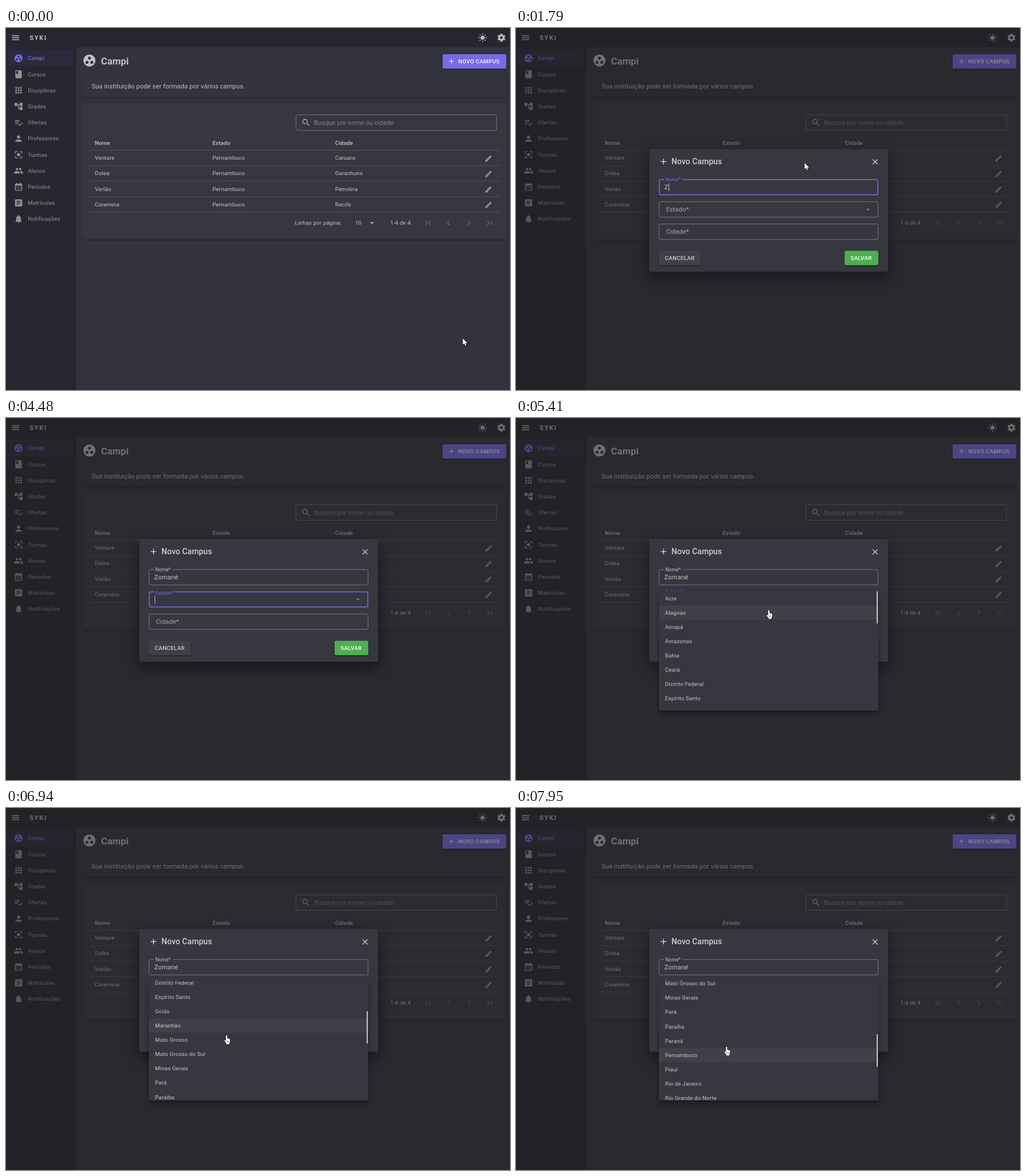
Recreate the animation shown at these times as an HTML page with a canvas. Size 882 px wide and 635 px high, loop 7990 ms.

```html
<!DOCTYPE html>
<html lang="pt-BR">
<head>
<meta charset="utf-8">
<title>Campi</title>
<style>
html, body { margin: 0; width: 100%; height: 100%; overflow: hidden; background: #32333d; }
canvas { display: block; }
</style>
</head>
<body>
<canvas id="stage" width="882" height="635"></canvas>
<script>
const ctx = document.getElementById('stage').getContext('2d');
const LOOP = 7990;
const SURFACE = '#373740', PRIMARY = '#776be7';
const white = a => `rgba(255,255,255,${a})`;

const ring = (x, y, r) => `M${x - r} ${y}a${r} ${r} 0 1 0 ${2 * r} 0a${r} ${r} 0 1 0 ${-2 * r} 0z`;
const cells = (xs, ys, s) => ys.map(y => xs.map(x => `M${x} ${y}h${s}v${s}h${-s}z`).join('')).join('');
const sheet = (x, y, w, h) => `M${x + 2} ${y}h${w - 4}a2 2 0 0 1 2 2v${h - 4}a2 2 0 0 1-2 2h${4 - w}a2 2 0 0 1-2-2v${4 - h}a2 2 0 0 1 2-2z`;

const ICONS = {
  group: ring(12, 12, 10) + ring(8, 15, 2.5) + ring(12, 8, 2.5) + ring(16, 15, 2.5),
  book: sheet(4, 2, 16, 20) + 'M6 4h5v8l-2.5-1.5L6 12z',
  grid: cells([4, 10, 16], [4, 10, 16], 4),
  tree: 'M22 11V3h-7v3H9V3H2v8h7V8h2v10h4v3h7v-8h-7v3h-2V8h2v3z',
  check: 'M3 6h11v2H3zM3 10h11v2H3zM3 14h7v2H3zM20.6 11.9L22 13.3 14.9 20.4 11 16.5l1.4-1.4 2.5 2.5z',
  person: ring(12, 8, 4) + 'M12 14c-2.7 0-8 1.3-8 4v2h16v-2c0-2.7-5.3-4-8-4z',
  focus: 'M5 15H3v4a2 2 0 0 0 2 2h4v-2H5zM5 5h4V3H5a2 2 0 0 0-2 2v4h2zM19 3h-4v2h4v4h2V5a2 2 0 0 0-2-2zM19 19h-4v2h4a2 2 0 0 0 2-2v-4h-2z' + ring(12, 12, 4),
  people: ring(16, 8, 3) + ring(8, 8, 3) + 'M8 13c-2.3 0-7 1.2-7 3.5V19h14v-2.5C15 14.2 10.3 13 8 13zM16 13l-1 .1c1.2.8 2 2 2 3.4V19h6v-2.5c0-2.3-4.7-3.5-7-3.5z',
  calendar: sheet(3, 4, 18, 18) + 'M6 2h2v2H6zM16 2h2v2h-2zM5 9h14v11H5z' + cells([7, 11, 15], [11, 15], 2),
  article: sheet(3, 3, 18, 18) + 'M7 7h10v2H7zM7 11h10v2H7zM7 15h7v2H7z',
  bell: 'M12 22a2 2 0 0 0 2-2h-4a2 2 0 0 0 2 2zM18 16v-5c0-3.1-1.6-5.6-4.5-6.3V4a1.5 1.5 0 0 0-3 0v.7C7.6 5.4 6 7.9 6 11v5l-2 2v1h16v-1z',
  search: ring(9.5, 9.5, 6.5) + ring(9.5, 9.5, 4.5) + 'M14 15.5l1.5-1.5 5 5-1.5 1.5z',
  edit: 'M14.1 9l.9.9L5.9 19H5v-.9zM17.7 3l-.7.3-1.8 1.8 3.7 3.7 1.8-1.8c.4-.4.4-1 0-1.4l-2.3-2.3zM14.1 6.2L3 17.3V21h3.7L17.8 9.9z',
  menu: 'M3 6h18v2H3zM3 11h18v2H3zM3 16h18v2H3z',
  plus: 'M11 5h2v6h6v2h-6v6h-2v-6H5v-2h6z',
  close: 'M19 6.4L17.6 5 12 10.6 6.4 5 5 6.4l5.6 5.6L5 17.6 6.4 19l5.6-5.6 5.6 5.6 1.4-1.4-5.6-5.6z',
  drop: 'M7 10l5 5 5-5z',
  left: 'M15.4 7.4L14 6l-6 6 6 6 1.4-1.4L10.8 12z',
  right: 'M10 6L8.6 7.4l4.6 4.6-4.6 4.6L10 18l6-6z',
  first: 'M18.4 16.6L13.8 12l4.6-4.6L17 6l-6 6 6 6zM6 6h2v12H6z',
  last: 'M5.6 7.4l4.6 4.6-4.6 4.6L7 18l6-6-6-6zM16 6h2v12h-2z'
};
const shapes = Object.fromEntries(Object.entries(ICONS).map(([k, d]) => [k, new Path2D(d)]));
const ARROW = new Path2D('M0 0v11.2l2.6-2.4 1.7 3.9 1.7-.7-1.7-3.8h3.6z');
const HAND = new Path2D('M-1.2 1a1.2 1.2 0 0 1 2.4 0v4l3.9.9q1.2.4 1 1.8l-.5 4q-.3 1.2-.9 2v1.5h-5.2v-1.3l-3.2-4.6q-.4-1.4 1-1.4l1.5 1.3z');

const NAV = [['Campi', 'group'], ['Cursos', 'book'], ['Disciplinas', 'grid'], ['Grades', 'tree'],
  ['Ofertas', 'check'], ['Professores', 'person'], ['Turmas', 'focus'], ['Alunos', 'people'],
  ['Períodos', 'calendar'], ['Matrículas', 'article'], ['Notificações', 'bell']];
const ROWS = [['Ventare', 'Caruaru'], ['Dolea', 'Garanhuns'], ['Verlão', 'Petrolina'], ['Coremina', 'Recife']];
const STATES = ['Acre', 'Alagoas', 'Amapá', 'Amazonas', 'Bahia', 'Ceará', 'Distrito Federal',
  'Espírito Santo', 'Goiás', 'Maranhão', 'Mato Grosso', 'Mato Grosso do Sul', 'Minas Gerais', 'Pará',
  'Paraíba', 'Paraná', 'Pernambuco', 'Piauí', 'Rio de Janeiro', 'Rio Grande do Norte',
  'Rio Grande do Sul', 'Rondônia', 'Roraima', 'Santa Catarina', 'São Paulo', 'Sergipe', 'Tocantins'];

// Timeline
const NAME = 'Zomané', KEYS = [1790, 2120, 2240, 2500, 3240, 3740];
const CLICK = 655, OPEN = 690, FOCUS = 725, TAB = 4386, LIST = 5090;
const NOTCHES = [6200, 6530, 6865, 7220], NOTCH_MS = 230, NOTCH = 71.1;
const PATH = [[30, 799.5, 544.5], [640, 798, 58], [850, 798, 58], [1580, 505, 236.5], [4500, 505, 236.5],
  [5060, 450, 329], [5150, 450, 329], [6366, 386, 399], [7600, 386, 399], [7840, 375, 425], [7950, 368.5, 419]];
const LIST_TOP = 303.6, LIST_H = 209.4, ROW = 25.1;

const ramp = (t, from, ms) => Math.min(1, Math.max(0, (t - from) / ms));
const smooth = u => u * u * (3 - 2 * u);
const easeOut = u => 1 - (1 - u) ** 3;
const mix = (a, b, p) => a + (b - a) * p;

function pointer(t) {
  const i = PATH.findIndex(k => k[0] > t);
  if (i < 0) return PATH[PATH.length - 1].slice(1);
  if (i === 0) return PATH[0].slice(1);
  const [t0, x0, y0] = PATH[i - 1], [t1, x1, y1] = PATH[i];
  const p = smooth((t - t0) / (t1 - t0));
  return [mix(x0, x1, p), mix(y0, y1, p)];
}

function text(s, x, cy, size = 9.8, color = white(.7), weight = 400, spacing = size * .0107) {
  ctx.font = `${weight} ${size}px Roboto, sans-serif`;
  ctx.letterSpacing = spacing + 'px';
  ctx.fillStyle = color;
  ctx.fillText(s, x, cy + size * .3415);
}

function icon(name, cx, cy, color, size = 16.8) {
  ctx.save();
  ctx.translate(cx - size / 2, cy - size / 2);
  ctx.scale(size / 24, size / 24);
  ctx.fillStyle = color;
  ctx.fill(shapes[name], 'evenodd');
  ctx.restore();
}

function box(x, y, w, h, fill, r = 2.8) {
  ctx.beginPath();
  ctx.roundRect(x, y, w, h, r);
  ctx.fillStyle = fill;
  ctx.fill();
}

function raised(x, y, w, h, fill, blur, dy, alpha) {
  ctx.save();
  ctx.shadowColor = `rgba(0,0,0,${alpha})`;
  ctx.shadowBlur = blur;
  ctx.shadowOffsetY = dy;
  box(x, y, w, h, fill);
  ctx.restore();
}

function outline(x, y, w, h, color, width) {
  ctx.beginPath();
  ctx.roundRect(x + width / 2, y + width / 2, w - width, h - width, 2.8);
  ctx.strokeStyle = color;
  ctx.lineWidth = width;
  ctx.stroke();
}

function disc(x, y, r, color) {
  ctx.beginPath();
  ctx.arc(x, y, r, 0, 7);
  ctx.fillStyle = color;
  ctx.fill();
}

function spokes(cx, cy, n, r0, r1, width, color) {
  ctx.beginPath();
  for (let i = 0; i < n; i++) {
    const a = i * 2 * Math.PI / n, c = Math.sin(a), s = -Math.cos(a);
    ctx.moveTo(cx + c * r0, cy + s * r0);
    ctx.lineTo(cx + c * r1, cy + s * r1);
  }
  ctx.strokeStyle = color;
  ctx.lineWidth = width;
  ctx.stroke();
}

function drawBars() {
  ctx.fillStyle = '#27272f';
  ctx.fillRect(0, 0, 882, 33.6);
  ctx.fillRect(0, 33, 123, 602);
  icon('menu', 16.7, 17, white(.7));
  text('SYKI', 41.3, 17, 11.2, white(.7), 700, 1.6);
  const c = '#bebec1';
  disc(834, 17, 3.6, c);
  spokes(834, 17, 8, 5.3, 7.5, 1.3, c);
  disc(867, 17, 5.4, c);
  spokes(867, 17, 6, 4, 7, 3.6, c);
  disc(867, 17, 2.4, '#27272f');

  box(2, 39, 115, 28, 'rgba(119,107,231,.07)');
  NAV.forEach(([label, name], i) => {
    const y = 53 + i * 28.2, color = i ? white(.5) : PRIMARY;
    icon(name, 22, y, color);
    text(label, 38.3, y, 9.8, color, i ? 400 : 500);
  });
}

function drawPage(t) {
  ctx.fillStyle = '#32333d';
  ctx.fillRect(0, 0, 882, 635);
  drawBars();
  icon('group', 146, 57, white(.7), 25.2);
  text('Campi', 166.3, 58.3, 16.8, white(.7), 700, 0);

  const hover = ramp(t, 600, 120) * (1 - ramp(t, 760, 250));
  raised(764, 46, 111.5, 25.2, PRIMARY, 3, 1.5, .35);
  box(764, 46, 111.5, 25.2, `rgba(90,75,226,${hover})`);
  const wave = ramp(t, CLICK, 500);
  if (wave > 0 && wave < 1) {
    ctx.save();
    ctx.beginPath();
    ctx.rect(764, 46, 111.5, 25.2);
    ctx.clip();
    disc(800, 57.5, 60 * wave + 2.5, white(.28 * (1 - wave)));
    ctx.restore();
  }
  icon('plus', 779.5, 58.5, white(.95), 14);
  text('NOVO CAMPUS', 791.6, 58.6, 9.8, white(.95), 500, .28);

  raised(134, 83.5, 741.5, 37.5, '#33343e', 2.5, 1.3, .35);
  text('Sua instituição pode ser formada por vários campus.', 149.7, 102.6, 11.2);

  raised(134, 132, 741.5, 239, SURFACE, 2.5, 1.3, .35);
  outline(507, 151.7, 352, 28.3, white(.34), .9);
  icon('search', 525, 165.8, white(.6));
  text('Busque por nome ou cidade', 539, 166, 11.2, white(.38), 400, 0);

  ['Nome', 'Estado', 'Cidade'].forEach((s, i) => text(s, [155.4, 361.4, 576][i], 201.3, 9.8, white(.72), 500));
  ctx.fillStyle = white(.14);
  for (let i = 0; i < 5; i++) ctx.fillRect(145, 214 + i * 27.15, 719, 1);
  ROWS.forEach(([name, city], i) => {
    const y = 228 + i * 27.1;
    text(name, 155.6, y);
    text('Pernambuco', 361.3, y);
    text(city, 576, y);
    icon('edit', 844.3, y + 1, white(.65), 14);
  });

  text('Linhas por página:', 505.5, 341.4);
  text('10', 611, 341.4);
  icon('drop', 640.3, 342, white(.6));
  text('1-4 de 4', 672.4, 341.4);
  ['first', 'left', 'right', 'last'].forEach((n, i) => icon(n, 738.7 + i * 35.8, 342, white(.26)));
}

// p: how far the label has floated into the border
function field(y, label, value, p, focused, caret) {
  outline(250, y, 384, 28, focused ? PRIMARY : white(.36), focused ? 1.5 : .9);
  const size = mix(11.2, 8.4, p);
  if (p > 0) {
    ctx.fillStyle = SURFACE;
    ctx.fillRect(259.3, y - .3, label === 'Nome*' ? 32 : 36, 2.2);
  }
  text(label, mix(262.4, 261.5, p), mix(y + 14.3, y + .9, p), size, focused ? PRIMARY : white(p ? .7 : .55));
  text(value, 259.6, y + 14.2, 11.2);
  if (caret) {
    ctx.fillStyle = white(.8);
    ctx.fillRect(260.2 + ctx.measureText(value).width, y + 7.5, .9, 13.3);
  }
}

function drawDialog(t) {
  const p = easeOut(ramp(t, OPEN, 150));
  const k = mix(.25, 1, p);
  ctx.save();
  ctx.globalAlpha = Math.min(1, p * 1.3);
  ctx.translate(442.2, 319.9);
  ctx.scale(k, k);
  ctx.translate(-442.2, -319.9);
  raised(233.3, 212.2, 417.7, 215.4, SURFACE, 26, 10, .45);
  icon('plus', 258.2, 234.4, white(.8));
  text('Novo Campus', 272, 234.6, 14, white(.75), 500, .05);
  icon('close', 628.5, 234.8, white(.72));

  const typed = KEYS.filter(k => t >= k);
  const onName = t < TAB;
  const since = t - (onName ? typed[typed.length - 1] || FOCUS : TAB);
  const blink = since % 1060 < 530;
  const tab = easeOut(ramp(t, TAB, 200));
  field(265.3, 'Nome*', NAME.slice(0, typed.length), easeOut(ramp(t, FOCUS, 200)), onName && t >= FOCUS, onName && blink);
  field(304.3, 'Estado*', '', tab, !onName, !onName && blink);
  field(343.3, 'Cidade*', '', 0, false, false);
  icon('drop', 616, 318.4, PRIMARY);

  raised(250, 390.8, 73.4, 25.3, '#404047', 3, 1.5, .35);
  text('CANCELAR', 260.6, 403.4, 9.8, white(.75), 500, .28);
  raised(575, 390.8, 59, 25.3, '#4caf50', 3, 1.5, .35);
  text('SALVAR', 585.6, 403.4, 9.8, '#fff', 500, .28);
  ctx.restore();
}

function drawList(t) {
  const scroll = NOTCHES.reduce((s, n) => s + NOTCH * smooth(ramp(t, n, NOTCH_MS)), 0);
  // the hovered row follows only settled scrolling and a slightly late pointer
  const settled = NOTCH * NOTCHES.filter(n => t >= n + NOTCH_MS).length;
  const active = Math.floor((pointer(t - 120)[1] - LIST_TOP + settled) / ROW);

  ctx.save();
  ctx.globalAlpha = easeOut(ramp(t, LIST, 200));
  raised(250, LIST_TOP, 384, LIST_H, SURFACE, 9, 4, .4);
  ctx.beginPath();
  ctx.roundRect(250, LIST_TOP, 384, LIST_H, 2.8);
  ctx.clip();
  STATES.forEach((s, i) => {
    const y = LIST_TOP + i * ROW - scroll;
    if (i === active) {
      ctx.fillStyle = white(.045);
      ctx.fillRect(250, y, 384, ROW);
    }
    text(s, 260.8, y + 12.6);
  });
  box(631.2, LIST_TOP + .5 + scroll * .327, 1.9, 56.5, '#d0d0d3', .5);
  ctx.restore();
}

function drawPointer(t) {
  if (t > 1870 && t < 4530) return;
  const [x, y] = pointer(t);
  const hand = (t > 600 && t < OPEN) || (t > 4530 && y > 304);
  const shape = hand ? HAND : ARROW;
  ctx.save();
  ctx.translate(x, y);
  ctx.lineJoin = 'round';
  ctx.lineWidth = 1.3;
  ctx.strokeStyle = '#111';
  ctx.stroke(shape);
  ctx.fillStyle = '#fff';
  ctx.fill(shape);
  if (hand) {
    ctx.fillStyle = '#555';
    for (let i = 0; i < 3; i++) ctx.fillRect(-.2 + i * 1.7, 9, .6, 3.4);
  }
  ctx.restore();
}

const start = performance.now();
function frame() {
  const t = (performance.now() - start) % LOOP;
  drawPage(t);
  if (t >= OPEN) {
    ctx.fillStyle = `rgba(33,33,33,${.5 * easeOut(ramp(t, OPEN, 180))})`;
    ctx.fillRect(0, 0, 882, 635);
    drawDialog(t);
  }
  if (t >= LIST) drawList(t);
  drawPointer(t);
  requestAnimationFrame(frame);
}
frame();
</script>
</body>
</html>
```
